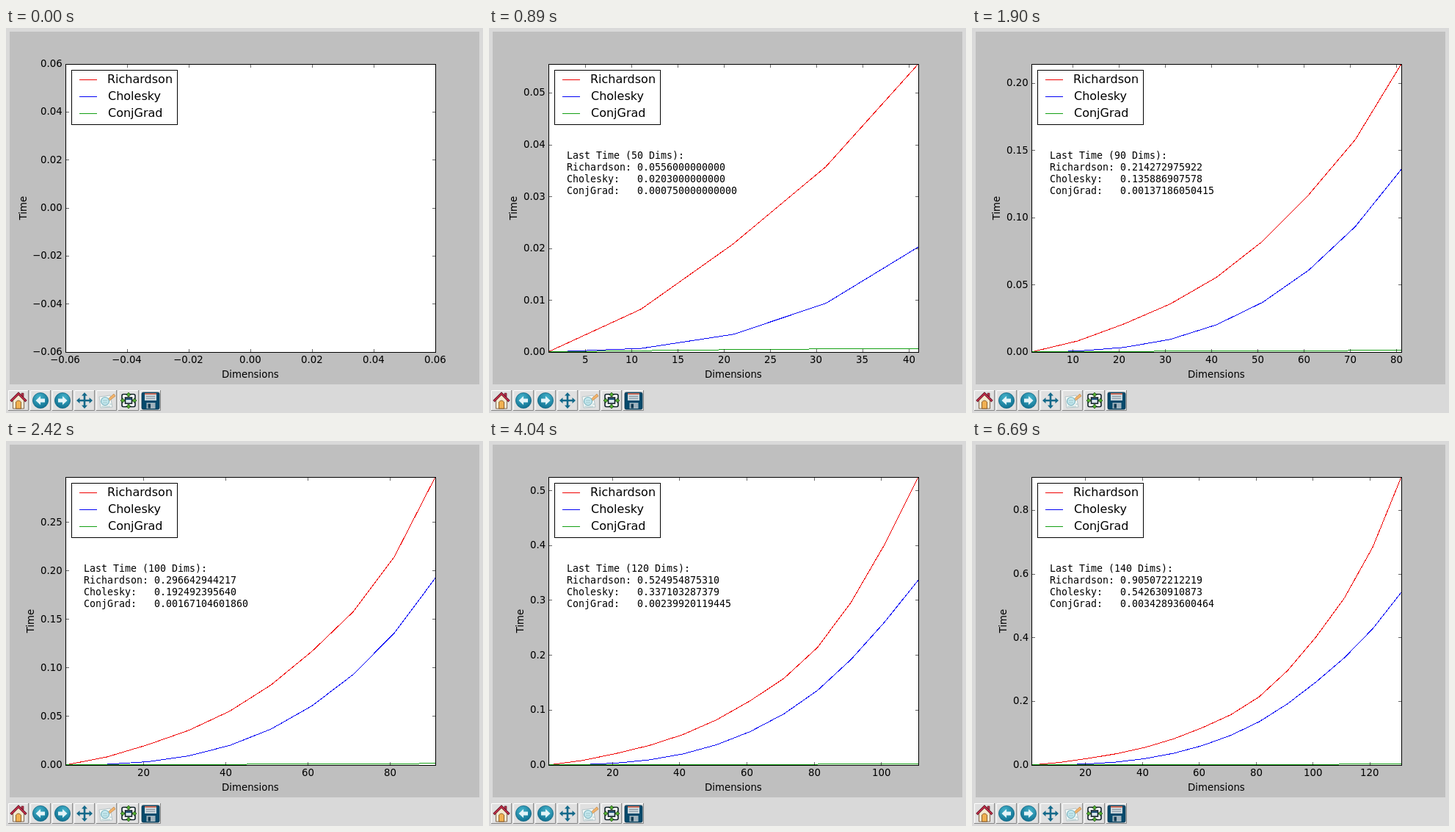
An HTML page that plays this animation: 650x524 px, repeating every 8000 ms.

```html
<!DOCTYPE html>
<html lang="en">
<head>
<meta charset="utf-8">
<title>Solver timings</title>
<style>
  html, body { margin: 0; width: 100%; height: 100%; overflow: hidden; background: #d9d9d9; }
  svg { display: block; }
  text { font: 13.333px "DejaVu Sans", sans-serif; fill: #000; }
  .key text { font-size: 16px; }
  .stats text { font: 13.29px "DejaVu Sans Mono", monospace; white-space: pre; }
  .ticks line { stroke: #000; stroke-width: .6; }
  .curve { fill: none; stroke-width: 1; shape-rendering: crispEdges; }
</style>
</head>
<body>
<svg width="650" height="524" viewBox="0 0 650 524">
  <defs>
    <clipPath id="figure"><rect x="5" y="5" width="640" height="480"/></clipPath>
    <clipPath id="axes"><rect x="81" y="49" width="505" height="393"/></clipPath>
    <radialGradient id="ball" cx=".4" cy=".3" r=".75">
      <stop offset="0" stop-color="#45b3cb"/><stop offset="1" stop-color="#0d6e8f"/>
    </radialGradient>
  </defs>
  <rect width="650" height="524" fill="#d9d9d9"/>
  <rect x="5" y="5" width="640" height="480" fill="#bfbfbf"/>
  <g clip-path="url(#figure)">
    <rect x="81.5" y="49.5" width="504" height="392" fill="#fff"/>
    <g id="curves" clip-path="url(#axes)"></g>
    <g id="ticks" class="ticks"></g>
    <rect x="81.5" y="49.5" width="504" height="392" fill="none" stroke="#000"/>
    <g id="xlabel"></g>
    <text id="ylabel" text-anchor="middle">Time</text>
    <g id="key" class="key">
      <rect x="89.5" y="57.5" width="144" height="74" fill="#fff" stroke="#000"/>
    </g>
    <g id="stats" class="stats"></g>
  </g>
  <g id="bar"></g>
</svg>
<script>
const LOOP = 8000;
const LEFT = 81.25, TOP = 49, WIDTH = 503.75, HEIGHT = 392, BOTTOM = TOP + HEIGHT, RIGHT = LEFT + WIDTH;

// One more measurement (dimension 1, 11, 21, ...) arrives at each time.
const arrivals = [530, 590, 660, 750, 890, 1000, 1220, 1510, 1900, 2420, 3130, 4040, 5200, 6690];

// Key measurements; a smooth curve supplies the dimensions between them.
const keyDims = [1, 11, 21, 41, 61, 81, 101, 121, 131];
const solvers = [
  { name: 'Richardson', color: '#f00000', keys: [.00011, .00831, .0209319591522, .0556,
    .117183923721, .214272975922, .402280807495, .685513019562, .905072212219] },
  { name: 'Cholesky', color: '#0000f5', keys: [.00005, .00074, .00346517562866, .0203,
    .0610218048096, .135886907578, .260746002197, .428796052933, .542630910873] },
  { name: 'ConjGrad', color: '#14a014', keys: [.00006, .00031, .000505924224854, .00075,
    .00101399421692, .00137186050415, .00202798843384, .00284790992737, .00342893600464] }
];

const dimOf = i => 1 + 10 * i;

// Cubic through the keys, with slopes taken from the neighbouring segments.
function interpolate(xs, ys, x) {
  const width = i => xs[i + 1] - xs[i], rise = i => (ys[i + 1] - ys[i]) / width(i);
  const last = xs.length - 1;
  const slope = i => i === 0 ? rise(0) : i === last ? rise(last - 1)
    : (width(i) * rise(i - 1) + width(i - 1) * rise(i)) / (xs[i + 1] - xs[i - 1]);
  const k = xs.findIndex(v => v >= x);
  if (xs[k] === x) return ys[k];
  const i = k - 1, h = width(i), t = (x - xs[i]) / h, u = 1 - t;
  return u * u * (1 + 2 * t) * ys[i] + t * t * (3 - 2 * t) * ys[k]
    + h * t * u * (u * slope(i) - t * slope(k));
}

for (const s of solvers) s.times = arrivals.map((_, i) => interpolate(keyDims, s.keys, dimOf(i)));

const byId = id => document.getElementById(id);
const text = (x, y, s) => `<text x="${x}" y="${y}">${s}</text>`;
const line = (x1, y1, x2, y2, extra = '') => `<line x1="${x1}" y1="${y1}" x2="${x2}" y2="${y2}" ${extra}/>`;
const snap = v => Math.floor(v) + .5;

// Text is aligned by its ink, on whole pixels.
const pen = document.createElement('canvas').getContext('2d');
function ink(s, size = 13.333) {
  pen.font = `${size}px "DejaVu Sans", sans-serif`;
  const m = pen.measureText(s), left = Math.floor(-m.actualBoundingBoxLeft);
  return { left, width: Math.ceil(m.actualBoundingBoxRight) - left };
}
function label(x, y, s, align = 0, size) {
  const box = ink(s, size);
  return text(Math.round(x - box.width * align) - box.left, y, s);
}

// Smallest 1-2-5 step that covers the range with nine intervals.
function tickStep(lo, hi) {
  const raw = (hi - lo) / 9, scale = 10 ** Math.floor(Math.log10(raw));
  for (const m of [1, 2, 5, 10]) {
    const step = m * scale;
    if (m >= raw / scale && (Math.floor(lo / step) + 9) * step >= hi) return step;
  }
  return 20 * scale;
}

function makeTicks([lo, hi], length) {
  const step = tickStep(lo, hi), slack = (hi - lo) / length / 2;
  const digits = Math.max(0, -Math.floor(Math.log10(step) + 1e-9));
  const list = [];
  for (let k = Math.ceil((lo - slack) / step); k * step <= hi + slack; k++) {
    const v = k * step;
    list.push({ at: (v - lo) / (hi - lo) * length, name: (k < 0 ? '\u2212' : '') + Math.abs(v).toFixed(digits) });
  }
  return list;
}

function seconds(v) {
  return v < 1e-4 ? v.toExponential(11).replace('e-', 'e-0') : v.toPrecision(12);
}

function limits(count) {
  if (!count) return { x: [-.06, .06], y: [-.06, .06] };
  return {
    x: count === 1 ? [.95, 1.05] : [1, dimOf(count - 1)],
    y: [Math.min(...solvers.map(s => s.times[0])), solvers[0].times[count - 1]]
  };
}

function drawAxes(lim) {
  const xs = makeTicks(lim.x, WIDTH), ys = makeTicks(lim.y, HEIGHT);
  const x0 = snap(LEFT), x1 = snap(RIGHT), y0 = snap(BOTTOM), y1 = snap(TOP);
  let out = '';
  for (const t of xs) {
    const x = LEFT + t.at, p = snap(x);
    out += line(p, y0, p, y0 - 4.5) + line(p, y1, p, y1 + 4.5) + label(x, 456, t.name, .5);
  }
  for (const t of ys) {
    const y = BOTTOM - t.at, p = snap(y);
    out += line(x0, p, x0 + 4.5, p) + line(x1, p, x1 - 4.5, p)
      + label(76.8, Math.round(y + 3.95), t.name, 1);
  }
  byId('ticks').innerHTML = out;
  const widest = Math.max(...ys.map(t => ink(t.name).width));
  byId('ylabel').setAttribute('transform', `translate(${68 - widest} 245) rotate(-90)`);
}

function drawCurves(lim, count) {
  const [x0, x1] = lim.x, [y0, y1] = lim.y;
  byId('curves').innerHTML = solvers.map(s => {
    const points = s.times.slice(0, count).map((v, i) =>
      [LEFT + (dimOf(i) - x0) / (x1 - x0) * WIDTH, BOTTOM - (v - y0) / (y1 - y0) * HEIGHT]);
    return `<polyline class="curve" stroke="${s.color}" points="${points.join(' ')}"/>`;
  }).join('');
}

function drawStats(count) {
  const rows = count ? [`Last Time (${count * 10} Dims):`,
    ...solvers.map(s => (s.name + ':').padEnd(12) + seconds(s.times[count - 1]))] : [];
  byId('stats').innerHTML = rows.map((r, i) => text(106, 178 + 16 * i, r)).join('');
}

let shown = -1;
function draw(t) {
  const count = arrivals.filter(a => a <= t).length;
  if (count === shown) return;
  shown = count;
  const lim = limits(count);
  drawAxes(lim);
  drawCurves(lim, count);
  drawStats(count);
}

// Toolbar icons, each centred on its button.
const path = (d, fill, extra = '') => `<path d="${d}" fill="${fill}" ${extra}/>`;
const turns = (d, fill, extra = '') => [0, 90, 180, 270].map(a => path(d, fill, `transform="rotate(${a})" ${extra}`)).join('');
const arrow = dir => `<g transform="scale(${dir} 1)"><circle r="10.6" fill="url(#ball)" stroke="#0b5f7d" stroke-width=".7"/>`
  + path('M-6.5 0L0-6V-2.5H6V2.5H0V6Z', '#e4f4f8') + '</g>';

const icons = [
  path('M-7.5-1L0-8L7.5-1V11H-7.5Z', '#f3ead0', 'stroke="#6b4a32" stroke-width=".8"')
    + path('M4-10H7V-5L4-8Z', '#b8324a', 'stroke="#5c1020" stroke-width=".6"')
    + path('M-10.5 1L0-9.5L10.5 1', 'none', 'stroke="#5c1020" stroke-width="3.2"')
    + path('M-10 .6L0-9.3L10 .6', 'none', 'stroke="#c8304c" stroke-width="1.8"')
    + path('M-3.5 11V2Q0-2 3.5 2V11Z', '#f0b050', 'stroke="#7a4a18" stroke-width=".8"'),
  arrow(1),
  arrow(-1),
  turns('M-1.3 0V-6.5H-4L0-11L4-6.5H1.3V0Z', '#14698a'),
  path('M-10-5L5-7L8 9L-8 10Z', '#f4f8f6', 'stroke="#a9babf" stroke-width=".8"')
    + path('M1-1L10-9L12-6L3 1Z', '#f2b36a', 'stroke="#b87a3c" stroke-width=".6"')
    + '<circle cx="-2" cy="1" r="5.5" fill="#c4e8ee" stroke="#7fb6c2" stroke-width="1.2"/>'
    + path('M-5 0H1M-5 3H1M4 5H7M-7 8H5', 'none', 'stroke="#93bcc0" stroke-width=".8"'),
  '<rect x="-9" y="-8.5" width="18" height="17" rx="2" fill="#fff" stroke="#102028" stroke-width="1.6"/>'
    + '<rect x="-4.5" y="-4" width="9" height="8" fill="#d8e4ec" stroke="#102028" stroke-width="1.6"/>'
    + path('M-4-2H4', 'none', 'stroke="#1d4f78" stroke-width="2"')
    + turns('M0-11L3.2-7.5H1.2V-5.5H-1.2V-7.5H-3.2Z', '#58b832', 'stroke="#143c10" stroke-width=".7"'),
  '<rect x="-12" y="-11" width="24" height="23" rx="2" fill="#064a6c" stroke="#03334c" stroke-width=".8"/>'
    + '<rect x="-8" y="-9.5" width="16" height="9.5" fill="#c9d4da"/>'
    + '<rect x="-8" y="-10" width="16" height="2" fill="#d0705c"/>'
    + path('M-6-5.5H6M-6-2.8H6', 'none', 'stroke="#7d909b" stroke-width=".9"')
    + '<rect x="-5.5" y="3" width="12" height="8" fill="#9fb2bd"/><rect x="-3.5" y="4.5" width="3.5" height="6" fill="#123c54"/>'
];

byId('bar').innerHTML = icons.map((icon, i) => `<g transform="translate(${17 + 30 * i} 507)">`
  + '<rect x="-14" y="-14" width="28" height="28" fill="#e0e0e0"/>'
  + path('M-13.5 14V-13.5H14', 'none', 'stroke="#fff"')
  + path('M-14 13.5H13.5V-14', 'none', 'stroke="#858585"')
  + icon + '</g>').join('');

byId('xlabel').innerHTML = label(LEFT + WIDTH / 2, 476, 'Dimensions', .5);

byId('key').innerHTML += solvers.map((s, i) =>
  line(100, 70.5 + 23 * i, 124, 70.5 + 23 * i, `stroke="${s.color}" stroke-width="1"`)
  + label(139, 75 + 23 * i, s.name, 0, 16)).join('');

function frame() {
  draw(performance.now() % LOOP);
  requestAnimationFrame(frame);
}
frame();
</script>
</body>
</html>
```
